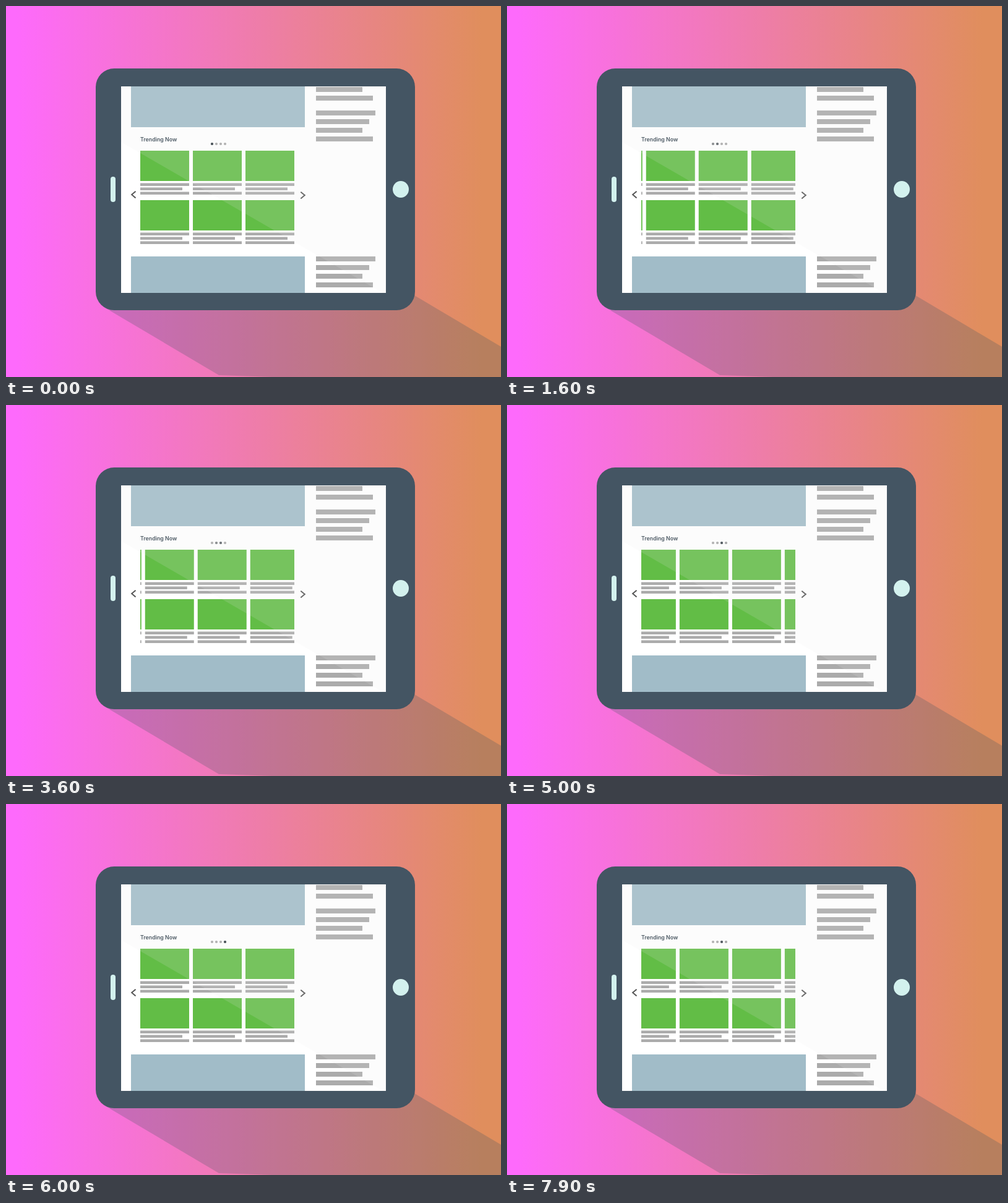
Animation of 800 by 600 pixels, one loop 8 s. Source, as an HTML page:

```html
<!DOCTYPE html>
<html lang="en">
<head>
<meta charset="utf-8">
<title>Tablet carousel</title>
<style>
  html, body { margin: 0; width: 100%; height: 100%; overflow: hidden; }
  svg { display: block; width: 800px; height: 600px; }
  .title { font: 600 8.8px Inter, Roboto, sans-serif; fill: #34434f; }
  .dots { fill: #a8a8a8; }
  .on { fill: #303a42; opacity: 0; }
  .arrow { fill: none; stroke: #555; stroke-width: 2; }

  /* Eleven even jumps per page, the first one right at the start */
  .strip, .on {
    animation: 8s steps(11, start) -2ms infinite;
  }
  .strip { animation-name: slide; }
  .d1 { animation-name: dot1; }
  .d2 { animation-name: dot2; }
  .d3 { animation-name: dot3; }
  .d4 { animation-name: dot4; }

  /* The way back is cut one jump before page three */
  @keyframes slide {
    0%, 12.5% { transform: translateX(0); }
    26.25%, 37.5% { transform: translateX(-255px); }
    51.25%, 62.5% { transform: translateX(-510px); }
    76.25% { transform: translateX(-765px); }
    87.5% { transform: translateX(-765px); animation-timing-function: steps(10, start); }
    100% { transform: translateX(-533.18px); }
  }
  @keyframes dot1 {
    0%, 12.5% { opacity: 1; }
    26.25%, 100% { opacity: 0; }
  }
  @keyframes dot2 {
    0%, 12.5% { opacity: 0; }
    26.25%, 37.5% { opacity: 1; }
    51.25%, 100% { opacity: 0; }
  }
  @keyframes dot3 {
    0%, 37.5% { opacity: 0; }
    51.25%, 62.5% { opacity: 1; }
    76.25% { opacity: 0; }
    87.5% { opacity: 0; animation-timing-function: steps(10, start); }
    100% { opacity: .909; }
  }
  @keyframes dot4 {
    0%, 62.5% { opacity: 0; }
    76.25% { opacity: 1; }
    87.5% { opacity: 1; animation-timing-function: steps(10, start); }
    100% { opacity: .091; }
  }
</style>
</head>
<body>
<svg viewBox="0 0 800 600">
  <defs>
    <linearGradient id="sky">
      <stop offset=".02" stop-color="#fe6afc"/>
      <stop offset=".96" stop-color="#e08e5d"/>
    </linearGradient>
    <clipPath id="screen"><path d="M186 130H614V464H186Z"/></clipPath>
    <clipPath id="window"><path d="M217 230H466V390H217Z"/></clipPath>
    <g id="card">
      <path fill="#62bd46" d="M217 234h79v49h-79z"/>
      <path fill="#ababab" d="M217 286.4h79v4.6h-79zM217 293.4h68v4.6h-68zM217 300.4h79v4.6h-79z"/>
    </g>
    <g id="column"><use href="#card"/><use href="#card" y="80"/></g>
    <g id="page">
      <use href="#column"/><use href="#column" x="85"/><use href="#column" x="170"/>
    </g>
  </defs>

  <rect width="800" height="600" fill="url(#sky)"/>
  <path fill="#445563" opacity=".26" d="M160 488L344 597L460 601L800 610V551L655 465Z"/>

  <rect x="145" y="101" width="516" height="391" rx="30" fill="#445563"/>
  <rect x="169" y="276" width="8" height="41" rx="4" fill="#d3f1ee"/>
  <ellipse cx="638" cy="296.5" rx="13" ry="13.5" fill="#d3f1ee"/>

  <g clip-path="url(#screen)">
    <path fill="#fff" d="M186 130H614V464H186Z"/>
    <path fill="#a1bcc8" d="M202 130h281v66h-281zM202 405h281v59h-281z"/>
    <path fill="#ababab" d="M501 131h75v8h-75zM501 145h92v8h-92z
      M501 169h96v8h-96zM501 183h86v8h-86zM501 197h75v8h-75zM501 211h92v8h-92z
      M501 405h96v8h-96zM501 419h86v8h-86zM501 433h75v8h-75zM501 447h92v8h-92z"/>

    <text class="title" x="217" y="219">Trending Now</text>
    <g class="dots">
      <circle cx="333" cy="223" r="2.1"/><circle cx="340" cy="223" r="2.1"/>
      <circle cx="347" cy="223" r="2.1"/><circle cx="354" cy="223" r="2.1"/>
    </g>
    <circle class="on d1" cx="333" cy="223" r="2.1"/>
    <circle class="on d2" cx="340" cy="223" r="2.1"/>
    <circle class="on d3" cx="347" cy="223" r="2.1"/>
    <circle class="on d4" cx="354" cy="223" r="2.1"/>

    <g clip-path="url(#window)">
      <g class="strip">
        <use href="#page"/><use href="#page" x="255"/>
        <use href="#page" x="510"/><use href="#page" x="765"/>
      </g>
    </g>
    <path class="arrow" d="M209.5 299.8L203.2 305L209.5 310.4M476.3 300.8L482.8 306L476.3 311.4"/>

    <path fill="#ebebeb" opacity=".15" d="M186 130H614V467L186 220Z"/>
  </g>
</svg>
</body>
</html>
```
